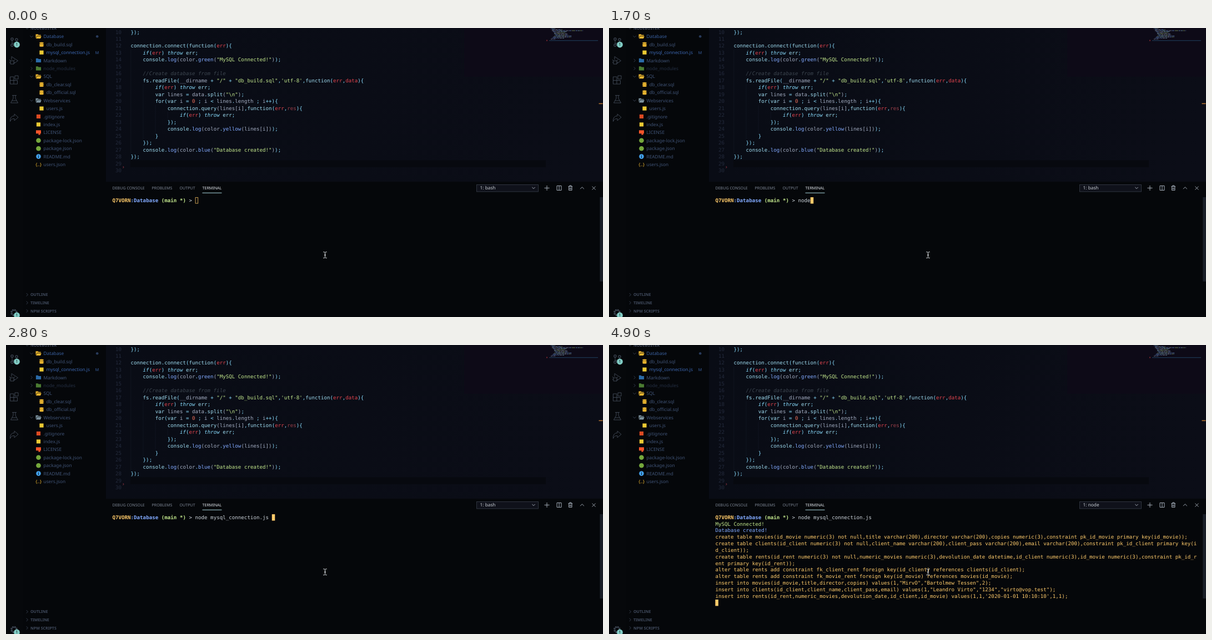
These frames come from a looping animation (1075x521 px, 8000 ms). An HTML page:

```html
<!DOCTYPE html>
<html lang="en">
<head>
<meta charset="utf-8">
<title>Editor and terminal</title>
<style>
html, body { margin: 0; width: 100%; height: 100%; overflow: hidden; background: #05070a; }
svg { display: block; width: 100%; height: 100%; }
text { white-space: pre; text-rendering: geometricPrecision; }
.mono { font: 9.18px "DejaVu Sans Mono", monospace; }
.ui { font: 8.3px "Noto Sans", "Open Sans", sans-serif; }
.tab { font: 7.1px "Noto Sans", "Open Sans", sans-serif; }
.head { font: bold 7.05px "Noto Sans", "Open Sans", sans-serif; }
.line { fill: none; stroke-width: 1; }
</style>
</head>
<body>
<svg id="stage" viewBox="0 0 1075 521" preserveAspectRatio="none"></svg>
<script>
const NS = 'http://www.w3.org/2000/svg';
const stage = document.getElementById('stage');
const LOOP = 8000, CELL = 5.527, COLS = 157, TERM_X = 191.4, TERM_Y = 310.7, TERM_ROW = 11.83;

function add(tag, attrs, parent = stage) {
  const el = document.createElementNS(NS, tag);
  for (const key in attrs) el.setAttribute(key, attrs[key]);
  parent.appendChild(el);
  return el;
}
const rect = (x, y, width, height, fill, more) => add('rect', { x, y, width, height, fill, ...more });
const circle = (cx, cy, r, fill, more) => add('circle', { cx, cy, r, fill, ...more });
const line = (d, stroke, more) => add('path', { d, stroke, class: 'line', ...more });
const shape = (d, fill) => add('path', { d, fill });
function label(x, y, str, cls, fill, parent) {
  const el = add('text', { x, y, class: cls, fill }, parent);
  el.textContent = str;
  return el;
}

// Markup: "~" plus one colour key starts a new run.
const INK = {
  d: '#a3adc2', c: '#9edbf0', k: '#89ddff', i: '#89ddff', b: '#82aaff', s: '#c3e88d',
  r: '#e0444e', q: '#9a3f49', n: '#f0705a', m: '#3c454f', y: '#ffcb6b',
  Y: '#ffcb6b', B: '#82aaff', G: '#c3e88d', w: '#ccd3da', o: '#ffcb6b'
};
function rich(x, y, markup, parent) {
  const el = add('text', { x, y, class: 'mono' }, parent);
  for (const run of markup.split('~').slice(1)) {
    const key = run[0];
    const span = add('tspan', { fill: INK[key] }, el);
    if ('im'.includes(key)) span.setAttribute('font-style', 'italic');
    if ('YBG'.includes(key)) span.setAttribute('font-weight', 'bold');
    span.textContent = run.slice(1);
  }
}

function drawBackground() {
  const defs = add('defs', {});
  const glow = add('linearGradient', { id: 'glow', x1: 0, x2: 1, y1: 0, y2: 0 }, defs);
  add('stop', { offset: 0, 'stop-color': '#090c15' }, glow);
  add('stop', { offset: 1, 'stop-color': '#0b0d17' }, glow);
  rect(0, 0, 1075, 521, '#05070a');
  rect(0, 0, 30, 521, '#06080b');
  rect(180, 0, 895, 277, 'url(#glow)');
  rect(825, 0, 250, 88, '#0d0a17');
  rect(224, 238.5, 748, 12.5, '#07090f');
  rect(180, 276.5, 895, 1, '#0a0d13');
}

function badge(x, y) {
  circle(x, y, 5.4, '#80cbc4');
  label(x - 1.9, y + 2.4, '1', 'tab', '#14201f');
}

function drawActivityBar() {
  const ink = '#3c4451', wide = { 'stroke-width': 1.3 };
  for (const [x, y] of [[11, 20], [19, 21], [11, 31]]) circle(x, y, 2.1, 'none', { stroke: ink, 'stroke-width': 1.2 });
  line('M11 22V29M19 23Q19 27 12 28', ink, wide);
  badge(19.5, 30);
  line('M10 57V51.5L21.5 59L13 65M8 59H14V65H8ZM6 62H8M14 62H16M8 59L6 57M14 59L16 57', ink, wide);
  line('M7.5 88H14V101H7.5ZM7.5 94.5H20.5V101H14M16 86H22V92H16Z', ink, wide);
  line('M11 121.5H19M13 122V127L8.5 135H21.5L17 127V122M11 131H19', ink, wide);
  line('M15 155L22 161L15 167V163.5Q9.5 163 7.5 168.5Q7 158.5 15 158.5Z', ink, wide);
  circle(14.5, 513, 5.2, 'none', { stroke: ink, 'stroke-width': 2.4, 'stroke-dasharray': '2.7 1.38' });
  circle(14.5, 513, 3.9, 'none', { stroke: ink, 'stroke-width': 1.3 });
  badge(19.5, 518);
}

const chevron = (x, y, open, ink = '#343d4d') =>
  line(open ? `M${x - 2.7} ${y - 1.3}l2.7 2.7l2.7 -2.7` : `M${x - 1.3} ${y - 2.7}l2.7 2.7l-2.7 2.7`, ink);

const icons = {
  folder(x, y, c) { shape(`M${x - 4.6} ${y - 3.8}h3.7l1.1 1.2h4.4v6h-9.2z`, c); },
  open(x, y, c) {
    shape(`M${x - 5} ${y - 4}h4l1.2 1.3h4v1.4h-7l-2.2 4.4z`, c);
    shape(`M${x - 2.6} ${y - .6}h7.9l-1.8 4.4h-8z`, c);
  },
  base(x, y, c) {
    for (const dy of [-2.6, .2, 2.6]) add('ellipse', { cx: x, cy: y + dy, rx: 3.8, ry: 1.5, fill: c });
    rect(x - 3.8, y - .3, 7.6, 1, c);
  },
  square(x, y, c) { rect(x - 3.6, y - 3.6, 7.2, 7.2, c); },
  dot(x, y, c) { circle(x, y, 4.3, c); },
  seal(x, y, c) {
    rect(x - 4.5, y - 4, 9, 6, c);
    shape(`M${x} ${y}h3v5l-1.5 -1l-1.5 1z`, c);
  },
  info(x, y, c) {
    circle(x, y, 4.3, c);
    rect(x - .5, y - .5, 1, 3, '#05070a');
    rect(x - .5, y - 2.4, 1, 1.1, '#05070a');
  },
  json(x, y, c) { label(x - 5.2, y + 2.7, '{..}', 'ui', c).setAttribute('font-weight', 'bold'); }
};

// name, icon, icon colour, depth, folder state, label colour
const GOLD = '#eab530', SCRIPT = '#ecc933', BLUE = '#3a609f', TEXT = '#405477', LEAF = '#75a83c';
const TREE = [
  ['Database', 'open', GOLD, 0, 'open', BLUE],
  ['db_build.sql', 'base', GOLD, 1],
  ['mysql_connection.js', 'square', SCRIPT, 1, '', '#3d68b2'],
  ['Markdown', 'folder', '#2a6aa6', 0, 'shut'],
  ['node_modules', 'folder', '#4b7c32', 0, 'shut', '#253044'],
  ['SQL', 'open', GOLD, 0, 'open'],
  ['db_clear.sql', 'base', GOLD, 1],
  ['db_official.sql', 'base', GOLD, 1],
  ['Webservices', 'open', '#7d929e', 0, 'open'],
  ['users.js', 'square', SCRIPT, 1],
  ['.gitignore', 'square', '#dc4a22', 0],
  ['index.js', 'square', SCRIPT, 0],
  ['LICENSE', 'seal', '#f4552a', 0],
  ['package-lock.json', 'dot', LEAF, 0],
  ['package.json', 'dot', LEAF, 0],
  ['README.md', 'info', '#42a0ea', 0],
  ['users.json', 'json', GOLD, 0]
];

function drawSidebar() {
  chevron(38, .5, true);
  label(44, 3.1, 'NODEBUSTER', 'head', '#424c5f');
  TREE.forEach(([name, icon, color, depth, fold, ink = TEXT], i) => {
    const y = 15.3 + i * 14.42;
    if (fold) chevron(46, y, fold === 'open');
    icons[icon](58.5 + depth * 5.5, y, color);
    label(67.5 + depth * 5, y + 3, name, 'ui', ink);
  });
  circle(164.2, 15.3, 2.3, '#293b5c');
  label(160.7, 46.8, 'M', 'tab', BLUE);
  ['OUTLINE', 'TIMELINE', 'NPM SCRIPTS'].forEach((name, i) => {
    const y = 480.8 + i * 14.6;
    chevron(38, y, false);
    label(44, y + 2.6, name, 'head', '#424c5f');
  });
}

const CODE = [
  '~k});',
  '',
  '~cconnection~k.~cconnect~k(~cfunction~k(~rerr~k){',
  '    ~iif~k(~rerr~k) ~ithrow ~cerr~k;',
  '    ~cconsole~k.~blog~d(color~k.~bgreen~d(~s"MySQL Connected!"~d)~k);',
  '',
  '    ~m//Create database from file',
  '    ~cfs~k.~creadFile~k(~d__dirname ~k+ ~s"/" ~k+ ~s"db_build.sql"~k,~s\'utf-8\'~k,~cfunction~k(~rerr~k,~rdata~k){',
  '        ~iif~k(~rerr~k) ~ithrow ~cerr~k;',
  '        ~cvar ~dlines ~k= ~ddata~k.~csplit~d(~s"\\n"~d)~k;',
  '        ~cfor~k(~cvar ~di ~k= ~n0 ~k; ~di ~k< ~dlines~k.~dlength ~k; ~di~k++){',
  '            ~cconnection~k.~cquery~d(lines[i]~k,~cfunction~k(~rerr~k,~qres~k){',
  '                ~iif~k(~rerr~k) ~ithrow ~cerr~k;',
  '            ~k});',
  '            ~cconsole~k.~blog~d(color~k.~byellow~d(lines[i])~k);',
  '        ~k}',
  '    ~k});',
  '    ~cconsole~k.~blog~d(color~k.~bblue~d(~s"Database created!"~d)~k);',
  '~k});',
  '',
  ''
];

function drawEditor() {
  const guide = (col, top, bottom) =>
    rect(224.5 + col * CELL, 1.3 + 12.49 * (top - 10), .7, 12.49 * (bottom - top + 1), '#141925');
  guide(0, 13, 27);
  guide(4, 18, 25);
  guide(8, 21, 24);
  guide(12, 22, 22);
  CODE.forEach((src, i) => {
    const y = 10.5 + i * 12.49, indent = src.search(/\S/);
    label(197, y, 10 + i, 'mono', '#242b3d');
    if (src) rich(224.5 + indent * CELL, y, src.trimStart());
  });
  line('M210.5 250h1.2v1.7l-1 1', '#8d3440');
}

function drawMinimap() {
  const inks = ['#6f97a4', '#71895a', '#737d90', '#5674a8'];
  let seed = 7;
  const rand = () => (seed = seed * 16807 % 2147483647) / 2147483647;
  for (let row = 0; row < 11; row++) {
    let x = 981 + [0, 2, 2, 4, 6, 6, 8, 6, 4, 2, 0][row];
    const end = row === 2 ? 1039 : row % 10 ? x + 10 + rand() * 26 : x + 8;
    while (x < end) {
      const w = 1.5 + rand() * 5;
      rect(x, .6 + row * 1.9, Math.min(w, end - x), .9, inks[Math.floor(rand() * 4)]);
      x += w + .9;
    }
  }
  rect(978, 22.2, 88, 1, '#20405f');
  rect(973, 21.5, 2, 2, '#7c2630');
  rect(1067.5, 135.6, 7, 1.5, '#b87530');
}

function drawPanel() {
  const ink = '#a2abb7';
  [['DEBUG CONSOLE', 191.5], ['PROBLEMS', 262.5], ['OUTPUT', 312.5]]
    .forEach(([name, x]) => label(x, 290.9, name, 'tab', '#7c8594'));
  label(353.5, 290.9, 'TERMINAL', 'tab', '#e0e5eb');
  rect(353.5, 296.8, 35, 1, '#a9d5dc');
  rect(847.5, 282.5, 111, 12.5, '#0f111a', { stroke: '#343a45', 'stroke-width': .9 });
  chevron(950, 288.3, true, ink);
  line('M969.5 288.5h9M974 284v9', ink);
  line('M992 284.5h8v8h-8zM996 284.5v8', ink);
  line('M1012.5 285.5h7.5M1014.8 285.3v-1.3h3v1.3M1013.5 286v6.5h5.5v-6.5M1015.3 287.5v3.5M1017.2 287.5v3.5', ink);
  line('M1034 290.2l3.4 -3.4l3.4 3.4', ink);
  line('M1055.5 285.6l6 6M1061.5 285.6l-6 6', ink);
  rect(1069.3, 305, 5.7, 152, '#191e27');
}

const PROMPT = '~YQ7VORN~B:Database ~G(main *) ~w> ';
const COMMAND = 'node mysql_connection.js ';
const REPLY = ['~sMySQL Connected!', '~bDatabase created!'];
const SQL = [
  'create table movies(id_movie numeric(3) not null,title varchar(200),director varchar(200),copies numeric(3),constraint pk_id_movie primary key(id_movie));',
  'create table clients(id_client numeric(3) not null,client_name varchar(200),client_pass varchar(200),email varchar(200),constraint pk_id_client primary key(id_client));',
  'create table rents(id_rent numeric(3) not null,numeric_movies numeric(3),devolution_date datetime,id_client numeric(3),id_movie numeric(3),constraint pk_id_rent primary key(id_rent));',
  'alter table rents add constraint fk_client_rent foreign key(id_client) references clients(id_client);',
  'alter table rents add constraint fk_movie_rent foreign key(id_movie) references movies(id_movie);',
  'insert into movies(id_movie,title,director,copies) values(1,"MirvO","Bartolmew Tessen",2);',
  'insert into clients(id_client,client_name,client_pass,email) values(1,"Leandro Virto","1234","virto@vop.test");',
  'insert into rents(id_rent,numeric_movies,devolution_date,id_client,id_movie) values(1,1,\'2020-01-01 10:10:10\',1,1);'
];
const wrap = str => str.match(new RegExp(`.{1,${COLS}}`, 'g')).map(part => '~o' + part);
const LOG = [...REPLY, ...SQL.flatMap(wrap)];

// start time, typed characters, visible log rows (-1 while typing)
const STEPS = [
  [0, 0, -1], [500, 0, -1], [1500, 2, -1], [1700, 4, -1], [1900, 5, -1], [2000, 6, -1],
  [2500, 8, -1], [2800, COMMAND.length, -1], [4500, COMMAND.length, 0],
  [4700, COMMAND.length, REPLY.length], [4900, COMMAND.length, LOG.length]
];

drawBackground();
drawActivityBar();
drawSidebar();
drawEditor();
drawMinimap();
drawPanel();
const shell = label(853.5, 291.3, '', 'ui', '#cdd3da');
const term = add('g', {});
const cursor = rect(0, 0, 5.5, 11.5, INK.y);
line('M571.3 403.8h2.2l1 1l1 -1h2.2M571.3 414.6h2.2l1 -1l1 1h2.2M574.5 404.8v8.8M573 409.3h3', '#e4e8ec', { 'stroke-width': 1.25 });

let shown = -1;
function update(t) {
  const step = STEPS.findLastIndex(([start]) => t >= start);
  if (step === shown) return;
  shown = step;
  const [, typed, rows] = STEPS[step];
  const running = rows >= 0, idle = step === 0;
  shell.textContent = running ? '1: node' : '1: bash';
  term.replaceChildren();
  [PROMPT + COMMAND.slice(0, typed), ...LOG.slice(0, Math.max(rows, 0))]
    .forEach((row, i) => rich(TERM_X, TERM_Y + 3 + i * TERM_ROW, row, term));
  const col = running ? 0 : 27 + typed;
  const inset = idle ? .5 : 0;
  cursor.setAttribute('x', TERM_X + col * CELL + inset);
  cursor.setAttribute('y', TERM_Y - 5.6 + (rows + 1) * TERM_ROW + inset);
  cursor.setAttribute('width', 5.5 - 2 * inset);
  cursor.setAttribute('height', 11.5 - 2 * inset);
  cursor.setAttribute('fill', idle ? 'none' : INK.y);
  cursor.setAttribute('stroke', idle ? '#c79d50' : 'none');
}

const began = performance.now();
function tick() {
  update((performance.now() - began) % LOOP);
  requestAnimationFrame(tick);
}
tick();
</script>
</body>
</html>
```
